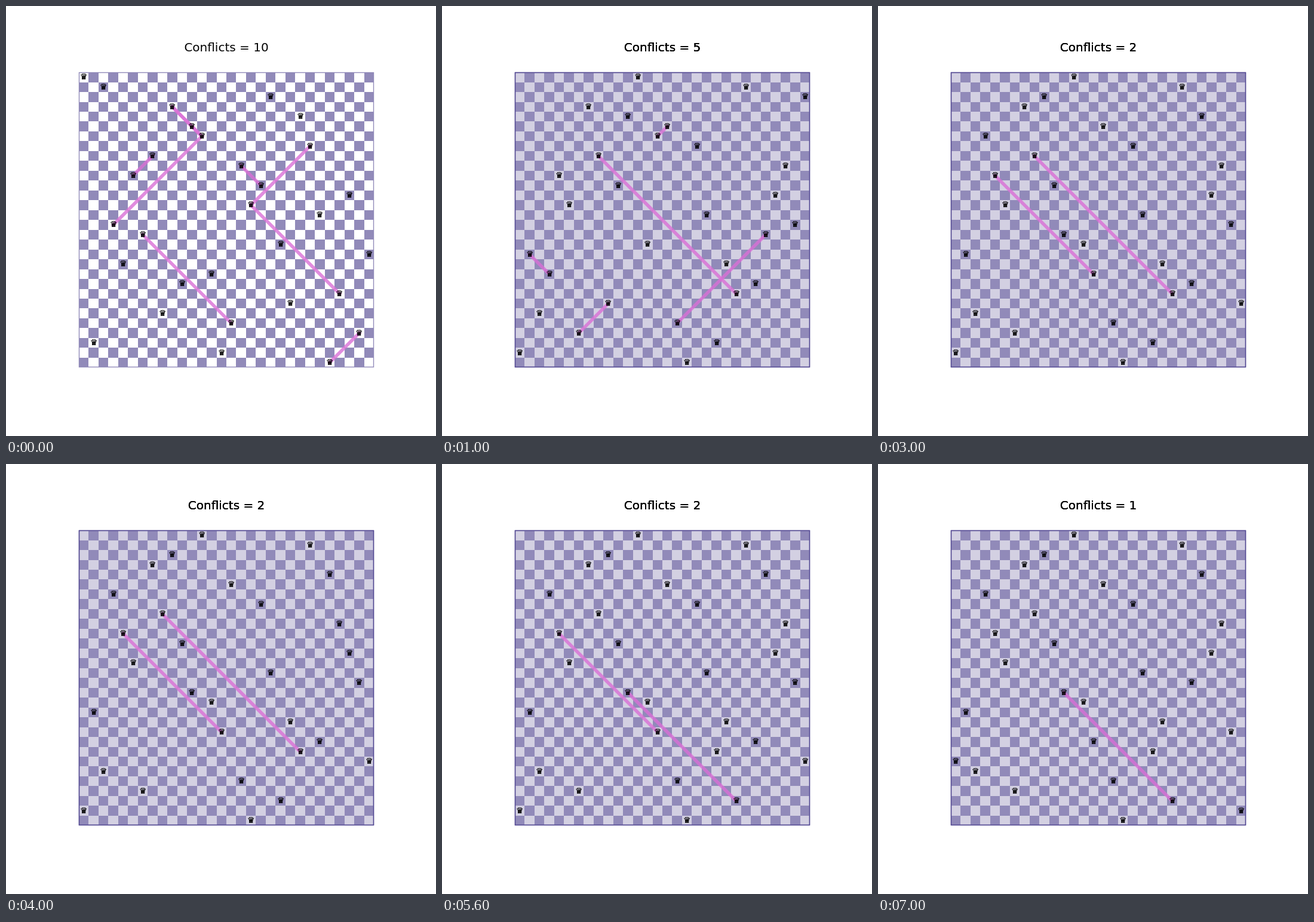
These frames come from a looping animation (720x720 px, 8 s). An HTML page with a canvas:

```html
<!DOCTYPE html>
<html lang="en">
<head>
<meta charset="utf-8">
<title>Queens</title>
<style>
  html, body { margin: 0; width: 100%; height: 100%; overflow: hidden; background: #fff; }
  canvas { display: block; width: 720px; height: 720px; }
</style>
</head>
<body>
<canvas id="stage" width="720" height="720"></canvas>
<script>
const ctx = document.getElementById('stage').getContext('2d');
const N = 30, CELL = 16.473, LEFT = 369 - N * CELL / 2, TOP = 111.115, LOOP = 8000;

function seededRandom(seed) {
  return () => (seed = (seed * 16807) % 2147483647) / 2147483647;
}

const attacks = (c1, r1, c2, r2) => r1 === r2 || Math.abs(r1 - r2) === Math.abs(c1 - c2);

// Fills the empty columns at random so that no new conflict arises.
function fillSafely(rows, random) {
  const col = rows.indexOf(null);
  if (col < 0) return true;
  const options = [...rows.keys()]
    .filter(row => rows.every((r, c) => r === null || !attacks(c, r, col, row)))
    .map(row => ({ row, key: random() }))
    .sort((a, b) => a.key - b.key);
  for (const { row } of options) {
    rows[col] = row;
    if (fillSafely(rows, random)) return true;
  }
  rows[col] = null;
  return false;
}

// A diagonal is [column, row, run]; a negative run climbs.
function layout(diagonals, seed, inherited = []) {
  const rows = Array.from({ length: N }, (_, c) => inherited[c] ?? null);
  for (const [col, row, run] of diagonals) {
    rows[col] = row;
    rows[col + Math.abs(run)] = row + run;
  }
  fillSafely(rows, seededRandom(seed));
  return rows;
}

// Row of the queen in each column, before the search refines it by trades.
const parent = [28, 18, 24, 20, 10, 13, 26, 3, 8, 23, 11, 4, 0, 17, 6,
  5, 25, 29, 7, 14, 27, 19, 22, 1, 21, 16, 12, 9, 15, 2];

const opening = layout([[9, 3, 2], [11, 5, 1], [3, 15, -9], [5, 10, -2], [6, 16, 9],
  [16, 9, 2], [17, 13, -6], [17, 13, 9], [25, 29, -3]], 11);

const sibling = layout([[1, 5, 12], [16, 2, 4], [15, 10, 3], [3, 28, 1], [4, 29, -20],
  [3, 28, -15], [7, 22, -7], [10, 11, 4], [14, 15, 12]], 29,
  parent.map((row, c) => c > 7 && c < 14 ? row : null));

const states = [];

function addState(at, rows) {
  const conflicts = [];
  rows.forEach((r1, a) => rows.forEach((r2, b) => {
    if (a < b && attacks(a, r1, b, r2)) conflicts.push([a, b]);
  }));
  states.push({ at, rows, conflicts });
}

// Pairs of columns trade rows, for good or only until a given time.
let kept = parent;
function traded(pairs) {
  const rows = kept.slice();
  for (const [a, b] of pairs) [rows[a], rows[b]] = [rows[b], rows[a]];
  return rows;
}
function keep(at, ...pairs) {
  kept = traded(pairs);
  addState(at, kept);
}
function attempt(at, until, ...pairs) {
  addState(at, traded(pairs));
  addState(until, kept);
}

addState(0, opening);
addState(200, sibling);
attempt(400, 1000, [18, 27]);
keep(1200, [3, 14]);
keep(1600, [11, 25]);
keep(2200, [22, 28]);
attempt(2400, 2600, [9, 29], [22, 28]);
keep(3000, [9, 29], [22, 28]);
attempt(3400, 3600, [26, 27]);
attempt(4000, 4200, [26, 27]);
attempt(4200, 4400, [8, 29]);
attempt(5000, 5400, [10, 26]);
attempt(5600, 6000, [20, 22]);
keep(6200, [0, 29], [20, 22], [14, 24], [24, 28]);
attempt(6800, 7000, [0, 29]);

const edgeX = i => Math.round(LEFT + i * CELL);
const edgeY = i => Math.round(TOP + i * CELL);
const midX = col => LEFT + (col + 0.5) * CELL;
const midY = row => TOP + (row + 0.5) * CELL;

function strokeBorder() {
  ctx.lineCap = 'butt';
  ctx.lineWidth = 1.39;
  ctx.strokeStyle = 'rgba(72,61,139,0.6)';
  ctx.strokeRect(122.5, 111.5, 493, 493);
}

function drawBoard(fresh) {
  ctx.fillStyle = fresh ? '#fff' : '#d3d0e2';
  ctx.fillRect(edgeX(0), edgeY(0), edgeX(N) - edgeX(0), edgeY(N) - edgeY(0));
  strokeBorder();
  ctx.fillStyle = '#918ab9';
  for (let r = 0; r < N; r++)
    for (let c = 1 - r % 2; c < N; c += 2)
      ctx.fillRect(edgeX(c), edgeY(r), edgeX(c + 1) - edgeX(c), edgeY(r + 1) - edgeY(r));
  if (!fresh) {
    strokeBorder();
    strokeBorder();
  }
}

function drawConflicts({ rows, conflicts }) {
  ctx.strokeStyle = 'rgba(218,112,214,0.8)';
  ctx.lineWidth = 5.56;
  ctx.lineCap = 'square';
  for (const [a, b] of conflicts) {
    ctx.beginPath();
    ctx.moveTo(midX(a), midY(rows[a]));
    ctx.lineTo(midX(b), midY(rows[b]));
    ctx.stroke();
  }
}

// Repeated passes thicken the soft edges of the glyphs.
function drawText(text, x, y, passes) {
  for (let i = 0; i < passes; i++) ctx.fillText(text, x, y);
}

function drawQueens(rows) {
  const queen = '\u265B';
  ctx.fillStyle = '#000';
  ctx.font = '13.89px "DejaVu Sans", sans-serif';
  ctx.textAlign = 'left';
  const box = ctx.measureText(queen);
  const dx = Math.round((box.actualBoundingBoxLeft - box.actualBoundingBoxRight) / 2);
  const dy = Math.round((box.actualBoundingBoxAscent - box.actualBoundingBoxDescent) / 2 - 0.25);
  rows.forEach((row, col) =>
    drawText(queen, Math.round(midX(col)) + dx, Math.round(midY(row) - 1.02) + dy, 2));
}

function drawTitle(count, passes) {
  ctx.fillStyle = '#000';
  ctx.font = '20px "DejaVu Sans", sans-serif';
  ctx.textAlign = 'center';
  drawText('Conflicts = ' + count, 369, 76, passes);
}

function draw(now) {
  const time = now % LOOP;
  const state = states.filter(s => s.at <= time).pop();
  const fresh = state === states[0];
  ctx.fillStyle = '#fff';
  ctx.fillRect(0, 0, 720, 720);
  drawBoard(fresh);
  drawConflicts(state);
  drawQueens(state.rows);
  drawTitle(state.conflicts.length, fresh ? 1 : 3);
}

const start = performance.now();
function tick() {
  draw(Math.max(0, performance.now() - start));
  requestAnimationFrame(tick);
}
tick();
</script>
</body>
</html>
```
